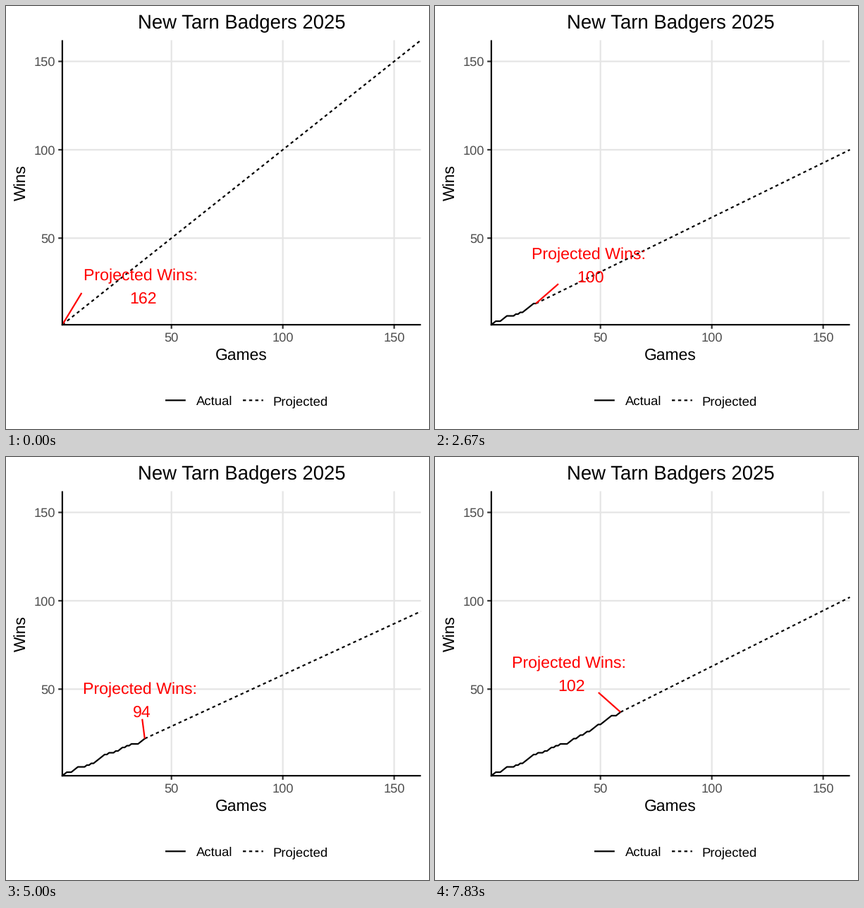
These frames come from a looping animation (600 px wide and 600 px high, 8000 ms). A matplotlib script:

```python
import math

import matplotlib.pyplot as plt
import numpy as np
from matplotlib.animation import FuncAnimation
from matplotlib.patches import Rectangle

SIZE, DPI = 600, 100
PT = 72 / DPI                       # points per pixel
LOOP, TICK, STEPS = 8000, 20, 48    # ms, ms, chart updates per loop
SEASON = 162
LEFT, RIGHT, TOP, BOTTOM = 79.9, 588.5, 48.5, 452.1
STROKE = 2.2
RED = "#ff0000"

RESULTS = ("WWWLLWWWLLLWLWLWWWWWLWLLWLWWLWLWLLL"
           "WWWLWWLWWLWWWWLWWWWWLLWW")
WINS = np.cumsum([r == "W" for r in RESULTS])

plt.rcParams["font.family"] = "Liberation Sans"
plt.rcParams["text.hinting"] = "none"


def px(game):
    return LEFT + (game - 1) * (RIGHT - LEFT) / (SEASON - 1)


def py(wins):
    return BOTTOM - (wins - 1) * (BOTTOM - TOP) / (SEASON - 1)


fig = plt.figure(figsize=(SIZE / DPI, SIZE / DPI), dpi=DPI, facecolor="white")
ax = fig.add_axes([0, 0, 1, 1])
ax.set_xlim(0, SIZE)
ax.set_ylim(SIZE, 0)
ax.axis("off")
panel = Rectangle((LEFT, TOP), RIGHT - LEFT, BOTTOM - TOP,
                  fc="none", ec="none")
ax.add_patch(panel)


def line(xs, ys, color="black", z=2, dashed=False, clip=False):
    style = (0, (2, 2)) if dashed else "-"
    item, = ax.plot(xs, ys, color=color, lw=STROKE * PT, ls=style, zorder=z,
                    solid_capstyle="butt", dash_capstyle="butt", snap=False)
    if clip:
        item.set_clip_path(panel)
    return item


def text(x, y, s, size, color="black", ha="center", **kw):
    return ax.text(x, y, s, fontsize=size * PT, color=color, ha=ha,
                   va="baseline", zorder=6, **kw)


# Grid, ticks and axes
for v in (50, 100, 150):
    gx, gy = px(v), py(v)
    line([gx, gx], [TOP, BOTTOM], "#e5e5e5", 1)
    line([LEFT, RIGHT], [gy, gy], "#e5e5e5", 1)
    line([gx, gx], [BOTTOM, BOTTOM + 5.7], "#333333", 4)
    line([LEFT - 5.7, LEFT], [gy, gy], "#333333", 4)
    text(gx, 476, str(v), 18.3, "#4d4d4d")
    text(69.8, gy + 6.6, str(v), 18.3, "#4d4d4d", ha="right")
line([LEFT, LEFT], [TOP, BOTTOM + STROKE / 2], z=5)
line([LEFT - STROKE / 2, RIGHT], [BOTTOM, BOTTOM], z=5)

# Titles and legend
text(334, 32, "New Tarn Badgers 2025", 27.5)
text(334, 502, "Games", 22.9)
text(28, 250.5, "Wins", 22.9, rotation=90, rotation_mode="anchor")
line([226, 254.8], [559.3, 559.3])
line([336, 364.8], [559.3, 559.3], dashed=True)
text(269.5, 566, "Actual", 18.5, ha="left")
text(378.5, 566, "Projected", 18.5, ha="left")

# Moving parts
actual = line([], [], z=3, clip=True)
projected = line([], [], z=3, dashed=True, clip=True)
pointer = line([], [], RED, 3.5, clip=True)
caption = text(0, 0, "Projected Wins:", 23.1, RED, ha="left")
count = text(0, 0, "", 23.1, RED)


def label_center(game):
    if game > 36:
        return 193.2
    return np.interp(game, [1, 8, 16, 26, 27, 36],
                     [194.3, 207, 210.5, 231, 235.5, 251])


def pointer_start(x, y, cx):
    """Where the pointer leaves the label box, drawn toward its middle."""
    mid, edge, side = y - 55, y - 27.8, cx - 87
    if x < side:
        near = math.hypot(side - x, y - edge)
        far = math.hypot(side - x, y - mid)
        return side, edge + (mid - edge) * near / far
    gap = cx - x
    return x + gap * 35 / math.hypot(gap, 35), edge


def draw(tick):
    # The chart changes on the tick nearest each sixth of a second.
    step = int((tick * TICK + 14) * STEPS / LOOP)
    game = round(1 + step * (SEASON - 1) / 130)
    wins = WINS[game - 1]
    total = round(SEASON * wins / game)
    x, y = px(game), py(wins)
    cx = label_center(game)

    actual.set_data(px(np.arange(1, game + 1)), py(WINS[:game]))
    projected.set_data([x, px(SEASON)], [y, py(total)])
    sx, sy = pointer_start(x, y, cx)
    pointer.set_data([sx, x], [sy, y])
    caption.set_position((cx - 84, y - 63))
    count.set_position((cx, y - 30.5))
    count.set_text(str(total))
    return actual, projected, pointer, caption, count


anim = FuncAnimation(fig, draw, frames=LOOP // TICK, interval=TICK,
                     init_func=lambda: draw(0), repeat=True, repeat_delay=0)
plt.show()
```
